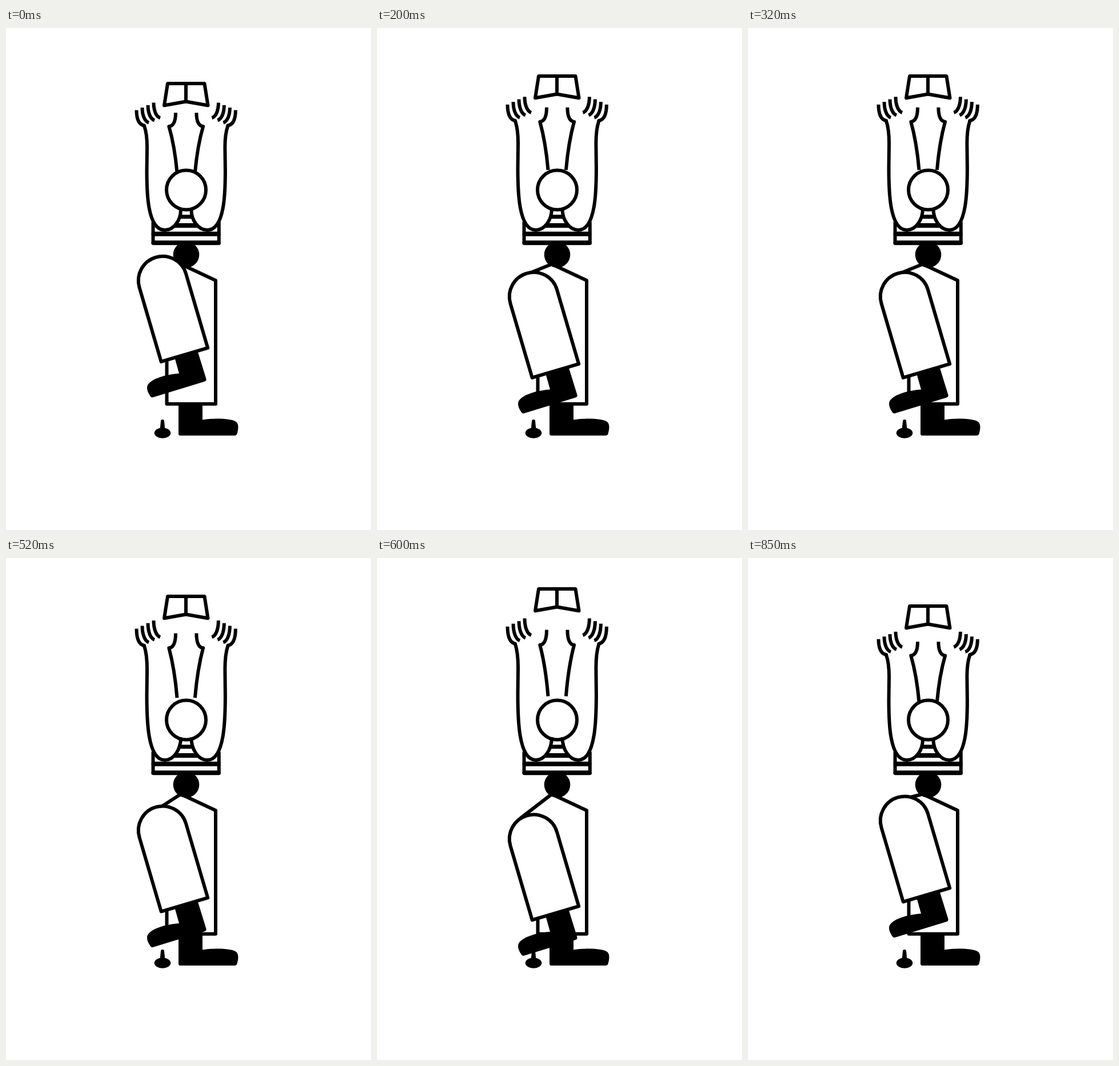
Recreate the animation shown at these times as an HTML page with a canvas. Size 639 px wide and 877 px high, loop 0.9 s.

```html
<!DOCTYPE html>
<html lang="en">
<head>
<meta charset="utf-8">
<title>Juggling figure</title>
<style>
  html, body { margin: 0; width: 100%; height: 100%; overflow: hidden; background: #fff; }
  canvas { display: block; }
</style>
</head>
<body>
<canvas id="stage" width="639" height="877"></canvas>
<script>
const ctx = document.getElementById('stage').getContext('2d');
const MID = 315.2;    // mirror axis of the upper body
const ELBOW = 353;    // arms stretch upwards from here
const LOOP = 900;

// book and leg: vertical offsets; outer and inner: arm stretch; shoulder: end of the left coat seam
const poses = [
  { until: 200, book: 0,   leg: 0,    outer: 1,     inner: 1,     shoulder: [295, 414] },
  { until: 400, book: -13, leg: 28,   outer: 1.047, inner: 1.045, shoulder: [264, 429.5] },
  { until: 600, book: -30, leg: 34.7, outer: 1.096, inner: 1.081, shoulder: [268, 437] },
  { until: 800, book: -43, leg: 49.5, outer: 1.113, inner: 1.11,  shoulder: [252, 454] },
  { until: 850, book: -30, leg: 34.7, outer: 1.047, inner: 1.045, shoulder: [268, 437] },
  { until: 900, book: -13, leg: 17.7, outer: 1.008, inner: 1.008, shoulder: [284, 418] }
];

const shape = d => new Path2D(d);
const book = shape('M283 97H347.5L353.5 135.3L315 128.5L277 135.3ZM315 97V128.5');
const outerArm = shape('M242 171C246 182 247 191 247 208L246.5 250C246.5 285 247 353 278 353C294 353 306 336 306 317');
const outerHand = shape('M228.5 143.5C228.5 157 232 169 242.5 170.5');
const innerArm = shape('M297 148C297 160 294 171 285.3 172C292 195 297 225 299.5 252.5');
const fingers = shape([0, 1, 2].map(i => {
  const x = 238.5 + i * 10, y = 139 - i * 4.2;
  return `M${x} ${y}c0 13 4 24 11.5 26.5`;
}).join(''));
const thigh = shape('M-42.5 135V0A42.5 42.5 0 0 1 42.5 0V135Z');
const raisedFoot = shape('M295 575L335 563L350.5 613Q351 616 348 617.5L258 645Q254.5 646.5 252.5 643Q246.5 634 247 628C247.5 616 272 606 303 603.5Z');
const standingFoot = shape('M302 655H344V684.5C360 682 392 681 403 688Q409 693 404.5 709Q403.5 712 400 712H305Q302 712 302 709Z');
const pinStem = shape('M271 687A3 3 0 0 1 277 687L278.5 702H269.5Z');

function disc(x, y, rx, ry = rx) {
  ctx.beginPath();
  ctx.ellipse(x, y, rx, ry, 0, 0, Math.PI * 2);
}

function line(points, width = 6) {
  ctx.lineWidth = width;
  ctx.beginPath();
  points.forEach(([x, y]) => ctx.lineTo(x, y));
  ctx.stroke();
}

function paint(path, color) {
  ctx.fillStyle = color;
  ctx.fill(path);
}

// Both sides of a left-hand path, stretched vertically about the elbows
function pair(path, stretch) {
  const both = new Path2D();
  const f = ELBOW * (1 - stretch);
  both.addPath(path, { a: 1, b: 0, c: 0, d: stretch, e: 0, f });
  both.addPath(path, { a: -1, b: 0, c: 0, d: stretch, e: 2 * MID, f });
  return both;
}

function drawCoat(shoulder) {
  line([[281.5, 500], [281.5, 656.7], [367, 656.7], [367, 441], [306, 412.5], shoulder]);
  ctx.fillStyle = '#000';
  disc(315.5, 396, 22.8);
  ctx.fill();
  paint(standingFoot, '#000');
}

function drawPin() {
  paint(pinStem, '#000');
  disc(274, 707.5, 14.3, 9.2);
  ctx.fill();
}

function drawLeg(dy) {
  ctx.save();
  ctx.translate(0, dy);
  paint(raisedFoot, '#000');
  ctx.translate(274.3, 441.3);
  ctx.rotate(-16.4 * Math.PI / 180);
  paint(thigh, '#fff');
  ctx.lineWidth = 6;
  ctx.stroke(thigh);
  ctx.restore();
}

function drawUpperBody(pose) {
  line([[257.5, 340], [257.5, 376], [372.8, 376], [372.8, 340]]);
  line([[258.5, 375.3], [371.8, 375.3]], 8);
  line([[258.5, 359.7], [371.8, 359.7]], 8);
  line([[292, 345], [338, 345]], 8);
  line([[304, 329.8], [326, 329.8]], 7);

  const arms = pair(outerArm, pose.outer);
  paint(arms, '#fff');

  ctx.fillStyle = '#fff';
  ctx.lineWidth = 6;
  disc(315.5, 283, 34.5);
  ctx.fill();
  ctx.stroke();

  ctx.lineCap = 'butt';
  ctx.stroke(arms);
  ctx.stroke(pair(outerHand, pose.outer));
  ctx.stroke(pair(fingers, pose.outer));
  ctx.stroke(pair(innerArm, pose.inner));
  // Rounded wrists
  const wrist = ELBOW + (170.5 - ELBOW) * pose.outer;
  ctx.fillStyle = '#000';
  for (const x of [242, 2 * MID - 242]) {
    disc(x, wrist, 3);
    ctx.fill();
  }
}

function drawBook(dy) {
  ctx.save();
  ctx.translate(0, dy);
  ctx.lineWidth = 6;
  ctx.stroke(book);
  ctx.restore();
}

function draw(time) {
  const t = time % LOOP;
  const pose = poses.find(p => t < p.until);
  ctx.fillStyle = '#fff';
  ctx.fillRect(0, 0, 639, 877);
  ctx.strokeStyle = '#000';
  ctx.lineJoin = 'round';
  ctx.lineCap = 'round';
  drawCoat(pose.shoulder);
  drawPin();
  drawLeg(pose.leg);
  drawUpperBody(pose);
  drawBook(pose.book);
}

let start;
function tick(now) {
  start ??= now;
  draw(Math.max(0, now - start));
  requestAnimationFrame(tick);
}
draw(0);
requestAnimationFrame(tick);
</script>
</body>
</html>
```
